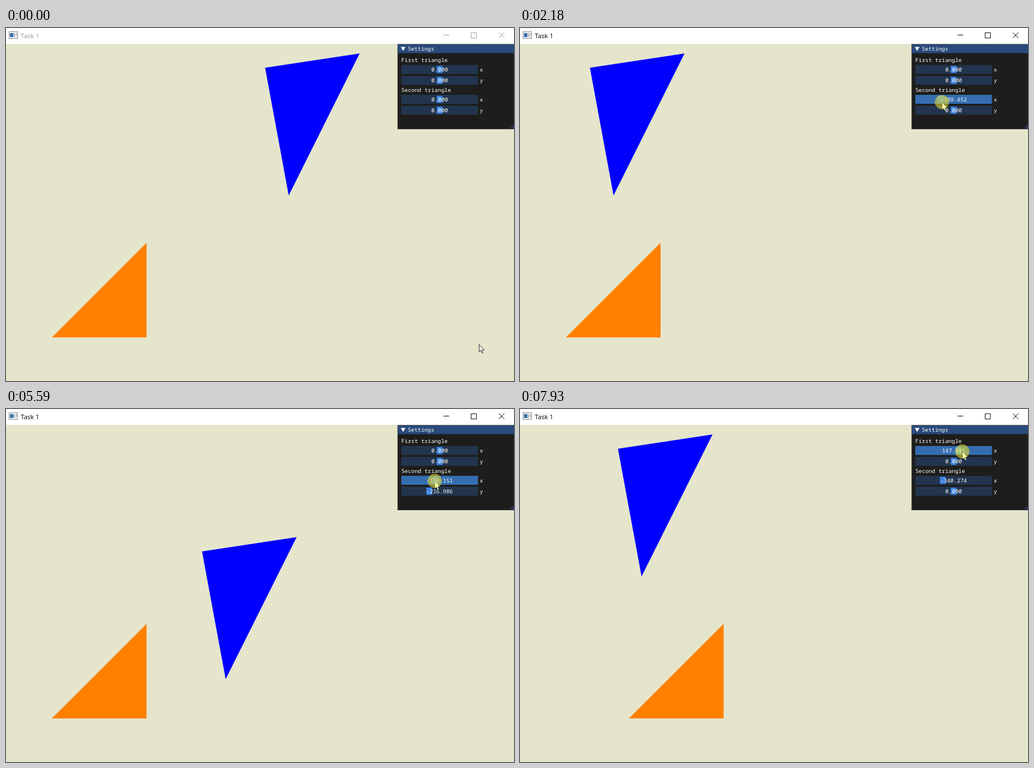
Write an HTML page with a canvas that moves like this. It is 897 px wide and 624 px high and loops after 8 s.

```html
<!DOCTYPE html>
<html lang="en">
<head>
<meta charset="utf-8">
<title>Task 1</title>
<style>
html, body { margin: 0; width: 100%; height: 100%; overflow: hidden; background: #e5e5cc; }
canvas { display: block; }
</style>
</head>
<body>
<canvas id="stage" width="897" height="624"></canvas>
<script>
const ctx = document.getElementById('stage').getContext('2d');
const LOOP = 8000;
const SCALE = 0.8362;                          // the whole window is drawn at this zoom
const STEP = { x: 1080 / 73, y: 720 / 73 };    // value of one slider pixel
const MONO = '9.75px "Noto Sans Mono", "DejaVu Sans Mono", monospace';
const SANS = '11.5px "Open Sans", "Noto Sans", sans-serif';
const ROW_X = 698, ROW_W = 135.4, ROW_H = 19 * SCALE, MID = ROW_X + ROW_W / 2;
const rowY = row => 65.4 + 23 * SCALE * row + (row > 1 ? 17 * SCALE : 0);

const linear = p => p;
const smooth = p => p * p * (3 - 2 * p);
const easeIn = p => p ** 1.5;
const easeOut = p => 1 - (1 - p) ** 1.5;

// Mouse moves. Those with a row hold the button and drag that slider by
// `pull` slider pixels; the button stays down until the next move.
const move = (from, to, x, y, drag) => ({ from, to, x, y, ease: smooth, lag: 0, ...drag });
const moves = [
  move(-1, 0, 835, 559),
  move(70, 71, 766, 136),
  move(220, 280, 840, 255),
  move(480, 820, 768, 147),
  move(960, 1160, 765, 127),
  move(1450, 2180, 745, 131, { row: 2, pull: -27, ease: easeOut }),
  move(2450, 2730, 764, 147),
  move(2930, 4030, 748, 150, { row: 3, pull: -22, ease: easeIn, lag: 60 }),
  move(4230, 4570, 768, 150),
  move(4640, 4910, 766, 127),
  move(5110, 6200, 744, 127, { row: 2, pull: -23 }),
  move(6490, 6800, 762, 169),
  move(6800, 7250, 768, 93),
  move(7320, 7480, 766, 71),
  move(7480, 7930, 781, 75, { row: 0, pull: 10, ease: linear, lag: 60 })
];
// Touching triangles reset every slider that is not being dragged
const resets = [3960, 5930];

const progress = (m, t) => m.ease(Math.min(1, Math.max(0, (t - m.from) / (m.to - m.from))));

function mouseAt(t) {
  const i = moves.findLastIndex(m => m.from <= t);
  const b = moves[i], a = moves[i - 1] || b, p = progress(b, t);
  return {
    x: Math.round(a.x + (b.x - a.x) * p),
    y: Math.round(a.y + (b.y - a.y) * p),
    held: b.row
  };
}

function sliderAt(row, t, lagged) {
  const m = moves.findLast(m => m.row === row && m.from <= t);
  if (!m || resets.some(r => r > m.to && r <= t)) return 0;
  return Math.round(m.pull * progress(m, lagged ? t - m.lag : t));
}

function rect(color, x, y, w, h) {
  ctx.fillStyle = color;
  ctx.fillRect(x, y, w, h);
}

function poly(color, points, dx = 0, dy = 0) {
  ctx.beginPath();
  points.forEach(([x, y]) => ctx.lineTo(x + dx, y + dy));
  ctx.closePath();
  ctx.fillStyle = color;
  ctx.fill();
}

function text(str, x, y, color = '#fff', font = MONO, align = 'left') {
  ctx.font = font;
  ctx.textAlign = align;
  ctx.fillStyle = color;
  ctx.fillText(str, x, y);
}

function drawTitleBar(active) {
  const ink = active ? '#000' : '#999';
  rect('#fff', 0, 0, 897, 28);
  rect('#858c94', 5, 6, 16, 13);
  rect('#f3f3f3', 6, 7, 14, 11);
  rect('#3a70ab', 7, 9, 6, 7);
  rect('#a9b0b8', 14, 9, 2, 7);
  rect('#858c94', 18, 9, 1, 5);
  text('Task 1', 26, 17.5, ink, SANS);
  ctx.strokeStyle = ink;
  ctx.lineWidth = 1;
  ctx.beginPath();
  ctx.moveTo(772.5, 12.5); ctx.lineTo(782.5, 12.5);
  ctx.rect(821.3, 8.3, 9.4, 9.4);
  ctx.moveTo(870.3, 8); ctx.lineTo(880, 17.7);
  ctx.moveTo(880, 8); ctx.lineTo(870.3, 17.7);
  ctx.stroke();
}

function drawRow(row, value, state) {
  const y = rowY(row), axis = row % 2 ? 'y' : 'x';
  rect({ idle: '#23354e', hover: '#2b4d74', active: '#356eb0' }[state], ROW_X, y, ROW_W, ROW_H);
  rect(state === 'active' ? '#4296fa' : '#3d85e0',
    MID + (value - 6) * SCALE, y + 2 * SCALE, 12 * SCALE, 15 * SCALE);
  text((value * STEP[axis]).toFixed(3), MID, y + 11.5, '#fff', MONO, 'center');
  text(axis, 836.5, y + 11.5);
}

function drawPanel(values, stateOf) {
  rect('#1d1d1b', 691.4, 28.4, 206, 150.5);
  rect('#294a7a', 692, 29, 205, 15.4);
  ctx.strokeStyle = 'rgba(110,110,128,.3)';
  ctx.lineWidth = SCALE;
  ctx.strokeRect(691.8, 28.8, 206, 149.7);
  poly('#fff', [[697, 33.5], [705.5, 33.5], [701.2, 40.5]]);
  poly('#28304d', [[897, 169.5], [897, 178.5], [888, 178.5]]);
  text('Settings', 709.5, 40.3);
  text('First triangle', 698, 60.3);
  text('Second triangle', 698, 113.3);
  values.forEach((v, row) => drawRow(row, v, stateOf(row)));
}

function drawCursor(x, y, pressed) {
  if (pressed) {
    ctx.beginPath();
    ctx.arc(x, y, 12.5, 0, 7);
    ctx.fillStyle = 'rgba(225,215,50,.6)';
    ctx.fill();
  }
  const arrow = [[0.4, 0.5], [0.4, 13.5], [3.3, 10.8], [5.3, 15.4], [7.2, 14.6], [5.3, 10.1], [9.2, 10]];
  poly(pressed ? '#ffffa8' : '#fff', arrow, x, y);
  ctx.strokeStyle = pressed ? 'rgba(0,0,0,.3)' : '#000';
  ctx.lineWidth = SCALE;
  ctx.stroke();
}

function draw(t) {
  const mouse = mouseAt(t), rows = [0, 1, 2, 3];
  const dragging = mouse.held !== undefined;
  const stateOf = row => {
    if (dragging) return mouse.held === row ? 'active' : 'idle';
    const dx = mouse.x - ROW_X, dy = mouse.y - rowY(row);
    return dx >= 0 && dx < ROW_W && dy >= 0 && dy < ROW_H ? 'hover' : 'idle';
  };
  const [ax, ay, bx, by] = rows.map(row =>
    sliderAt(row, t, true) * SCALE * (row % 2 ? -STEP.y : STEP.x));

  rect('#e5e5cc', 0, 0, 897, 624);
  poly('#ff8000', [[81, 547], [248.2, 547], [248.2, 379.8]], ax, ay);
  poly('#00f', [[457.5, 70.2], [624.5, 45], [499.2, 296]], bx, by);
  drawTitleBar(t >= 1450);
  drawPanel(rows.map(row => sliderAt(row, t, false)), stateOf);
  drawCursor(mouse.x, mouse.y, dragging);
}

const start = performance.now();
function tick() {
  draw((performance.now() - start) % LOOP);
  requestAnimationFrame(tick);
}
tick();
</script>
</body>
</html>
```
